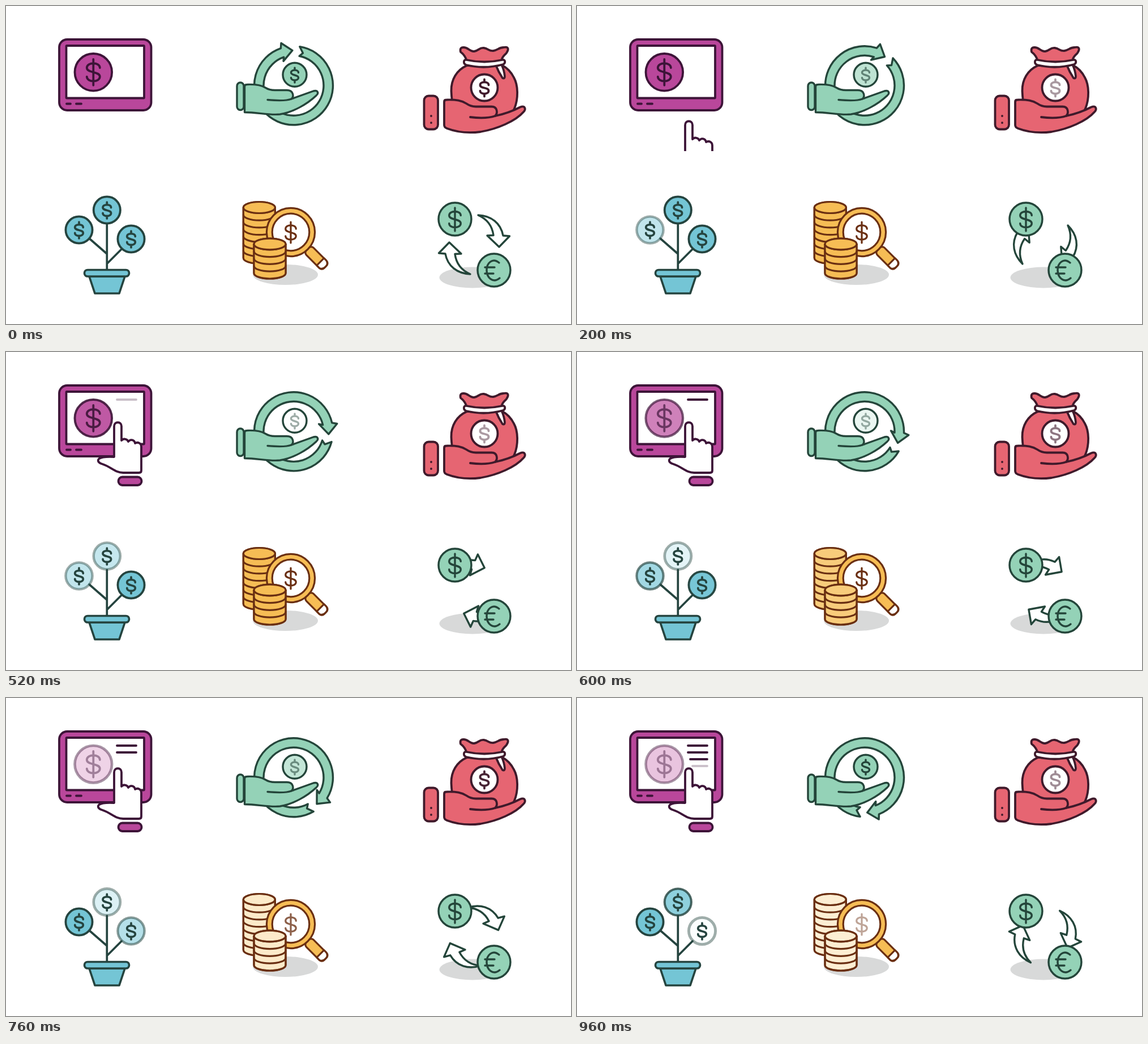
These frames come from a looping animation (998x561 px, 1000 ms). An HTML page:

```html
<!DOCTYPE html>
<html lang="en">
<head>
<meta charset="utf-8">
<title>Money icons</title>
<style>
html, body { margin: 0; width: 100%; height: 100%; overflow: hidden; background: #fff; }
svg { display: block; width: 100%; height: 100%; }
g { --f: 1; }
.icon { stroke-linecap: round; stroke-linejoin: round; }
.purple { fill: #b9479b; stroke: #3d1438; stroke-width: 3.8px; }
.green { fill: #94d2b7; stroke: #24453a; stroke-width: 3.4px; }
.red { fill: #e66572; stroke: #3f1a2b; stroke-width: 3.8px; }
.blue { fill: #74c5d5; stroke: #25443f; stroke-width: 3.7px; }
.gold { fill: #f6bd55; stroke: #6a2f12; stroke-width: 3.2px; }
.white { fill: #fff; }
.line { fill: none; }
.shadow { fill: #d8d9d9; stroke: none; }
/* --f is how full a fading group is; outlines never drop below .44 */
.fill { fill-opacity: var(--f); }
.soft { stroke-opacity: max(.44, var(--f)); }
circle.soft { stroke-width: calc(3.8px + 1.1px * (1 - var(--f))); }
</style>
</head>
<body>
<svg id="stage" viewBox="0 0 998 561"></svg>
<script>
const polar = (r, deg) => {
  const a = deg * Math.PI / 180;
  return (508 + r * Math.cos(a)).toFixed(2) + ',' + (140.3 + r * Math.sin(a)).toFixed(2);
};

const circle = (x, y, r, cls = '') => `<circle cx="${x}" cy="${y}" r="${r}" class="${cls}"/>`;
const rect = (x, y, w, h, r, cls = '') =>
  `<rect x="${x}" y="${y}" width="${w}" height="${h}" rx="${r}" class="${cls}"/>`;
const path = (d, cls = '') => `<path d="${d}" class="${cls}"/>`;
const ellipse = (x, y, rx, ry, cls) =>
  `<ellipse cx="${x}" cy="${y}" rx="${rx}" ry="${ry}" class="${cls}"/>`;

// Dollar sign of height h; the bar either runs through or only shows at the ends
function dollar(x, y, h, through, cls = '') {
  const bar = through ? 'M0-50V50' : 'M0-50V-34M0 34V50';
  return `<path class="line ${cls}" vector-effect="non-scaling-stroke"
    transform="translate(${x} ${y}) scale(${h / 100})"
    d="M25-17C25-40-25-40-25-17C-25 4 25-4 25 17C25 40-25 40-25 17${bar}"/>`;
}

// Pile of coins over a white base, so that fading shows white and not what lies behind
function stack(x, y, ry, count, step) {
  const rx = 28, end = y + count * step;
  const side = `M${x - rx},${y}V${end}A${rx},${ry} 0 0 0 ${x + rx},${end}V${y}`;
  const top = ellipse(x, y, rx, ry, 'white') + ellipse(x, y, rx, ry, 'fill');
  let s = path(side, 'white') + path(side, 'fill');
  for (let i = 1; i < count; i++)
    s += path(`M${x - rx},${y + i * step}a${rx},${ry} 0 0 0 ${2 * rx},0`, 'line');
  return s + top;
}

const tablet = `<g class="icon purple">
  ${rect(94, 59, 162.5, 125, 14)}${rect(106.5, 70, 137.5, 92.5, 1, 'white')}
  ${path('M107,172.5h7M124,172.5h9')}
  <g id="tabletCoin">${circle(154.3, 116.8, 32.8, 'fill soft')}${dollar(154.3, 116.8, 46, true, 'soft')}</g>
  ${[195, 195, 199, 203].map((x, i) => `<path class="row" d="M${x + 1},${84 + 12 * i}H230"/>`).join('')}
  <clipPath id="edge"><rect x="90" y="40" width="180" height="216"/></clipPath>
  <g clip-path="url(#edge)"><g id="finger">
    ${path(`M191,185V131C191,122 204,122 204,131V156C207,152 214,153 216,158C220,153 227,155 228,161
      C233,158 239,161 239,167V209Q239,213 235,213H207C193,213 186,203 171,198C164,196 162,193 163,190
      C165,186 175,184 191,185Z`, 'white')}
    ${rect(198.5, 220.5, 41, 14.5, 7)}
  </g></g>
</g>`;

const ring = `M${polar(69.5, -81)}A69.5,69.5 0 1 1 ${polar(69.5, 251)}L${polar(78, 253.6)}L${polar(62, 268)}
  L${polar(46.6, 247.3)}L${polar(53, 251)}A53,53 0 1 0 ${polar(53, -79)}L${polar(59.5, -74)}Z`;
const cycle = `<g class="icon green">
  <g id="ring">${path(ring)}</g>
  ${rect(408, 135, 12, 48.5, 6)}
  ${path(`M421.5,187.5V142Q421.5,138.5 426,138.5C440,138 450,139 458,144Q465,148.5 475,148.5H496
    C508,148.5 509,160 504,164L543,150C551,148 553,154 548,158C532,173 508,187 484,191
    C464,193 445,187.5 421.5,187.5Z`)}
  ${path('M504,164C494,168 478,167 462,165.5', 'line')}
  <g id="cycleCoin">${circle(510, 121.3, 21, 'fill')}${dollar(510, 122, 26, false, 'soft')}</g>
</g>`;

const bag = `<g class="icon red">
  ${path('M814,105C796,113 786,130 786.5,150Q787,166 792,195H880Q894,192 898,181C905,164 905,140 897,126Q890,112 877,105Z')}
  ${path(`M814,97Q811,87 803,81Q801,73 808,73C817,73 819,81 827,80C835,79 836,73 844,74
    C852,75 853,80 861,79C868,78 871,73 879,73Q888,71 886.5,78Q885,83 880,87Q876,91 875,97Q845,106 814,97Z`)}
  ${path('M866,106C869,114 873,121 877,127Q881,129 881,124Q880,113 875,103Z', 'white')}
  ${path('M813,95Q845,102 877,95C882,94 883,101 878,103Q845,112 813,104C807,102 808,94 813,95Z', 'white')}
  ${circle(845, 144, 23.5, 'white')}
  <g id="bagSign">${dollar(845, 144.5, 30, false, 'soft')}</g>
  ${rect(738.5, 158.5, 24.5, 59, 8)}${path('M751,194v.1M751,206v.1')}
  ${path(`M774,210V169Q774,165.5 778,165.5C796,165 805,167 813,172Q821,177.5 830,177.5H858
    C868,177.5 869,189 864,194Q888,189 908,178.5C917,175 919,182 914,187C900,203 868,217 838,222
    C815,225 795,222 779,216Q774,214 774,210Z`)}
  ${path('M864,194C852,198 836,198 820,196', 'line')}
</g>`;

const leaf = (id, x, y) => `<g id="${id}">${circle(x, y, 23.6, 'fill soft')}${dollar(x, y + .5, 29, false)}</g>`;
const plant = `<g class="icon blue">
  ${path('M178.3,384V465M147,410L178,437M204,429L179,454', 'line')}
  ${path('M147,477L157,507H200L210,477Z')}${rect(138.5, 465.5, 79, 11.5, 5.7)}
  ${leaf('leafA', 129, 395)}${leaf('leafB', 178.3, 360)}${leaf('leafC', 221, 411)}
</g>`;

const search = `<g class="icon gold">
  ${ellipse(493.5, 474, 57.5, 18, 'shadow')}
  <g id="stackA">${stack(447.3, 355.5, 10, 7, 12.7)}</g>
  <g transform="translate(503 399) rotate(45)">
    ${rect(42, -9, 44.5, 18, 6)}${path('M74,-9H80Q86.5,-8 86.5,0T80,9H74Z', 'white')}
  </g>
  ${circle(503, 399, 42.6)}${circle(503, 399, 32.8, 'white')}
  <g id="lensSign">${dollar(503, 399.5, 37, true, 'soft')}</g>
  <g id="stackB">${stack(466, 420, 9.8, 4, 12.8)}</g>
</g>`;

const arrow = path(`M834,369C857,370 874,383 878,405L889.5,406L871,425L850,405L861,404.5
  C859,389 850,376 834,369Z`, 'white');
const exchange = `<g class="icon green">
  ${ellipse(824, 479, 58.5, 18.5, 'shadow')}
  <g id="arrows">${arrow}<g transform="rotate(180 827 421)">${arrow}</g></g>
  ${circle(793, 376, 29)}${dollar(793, 376.5, 41, true)}
  ${circle(862, 466, 29)}
  ${path('M871,453C859,443 849,454 849,466C849,479 860,490 872,480M846,461H863M846,472H861', 'line')}
</g>`;

const $ = id => document.getElementById(id);
$('stage').innerHTML = tablet + cycle + bag + plant + search + exchange;
const rows = document.querySelectorAll('.row');

const clamp = v => Math.max(0, Math.min(1, v));
const dip = (t, low, span = 360) => clamp(Math.abs(t - low) / span);
const fade = (id, v) => $(id).style.setProperty('--f', v.toFixed(3));
const turn = (id, deg, x, y) => $(id).setAttribute('transform', `rotate(${deg} ${x} ${y})`);

// Linear interpolation through [time, value] pairs
function keys(t, ...k) {
  const i = k.findIndex(p => p[0] > t);
  if (i < 0) return k[k.length - 1][1];
  if (!i) return k[0][1];
  const [a, b] = [k[i - 1], k[i]];
  return a[1] + (b[1] - a[1]) * (t - a[0]) / (b[0] - a[0]);
}

function draw(t) {
  $('finger').setAttribute('transform', `translate(0 ${Math.max(0, 134 - .275 * t)})`);
  rows.forEach((row, i) => row.style.opacity = clamp((t - 490 - 147 * i) / 110));
  fade('tabletCoin', dip(t, 845));
  turn('ring', .185 * t, 508, 140.3);
  fade('cycleCoin', dip(t, 510, t < 510 ? 510 : 450));
  fade('bagSign', keys(t, [0, 1], [180, .45], [520, .42], [780, 1], [880, .85], [960, .5]));
  fade('leafA', dip(t, 360));
  fade('leafB', dip(t, 670));
  fade('leafC', dip(t, 950));
  fade('stackA', dip(t, 870, 350));
  fade('stackB', dip(t, 870, 350));
  fade('lensSign', keys(t, [690, 1], [860, .44]));
  turn('arrows', .21 * t, 827, 421);
}

function tick() {
  draw(Math.floor(performance.now() % 1000 / 40) * 40);
  requestAnimationFrame(tick);
}
tick();
</script>
</body>
</html>
```
